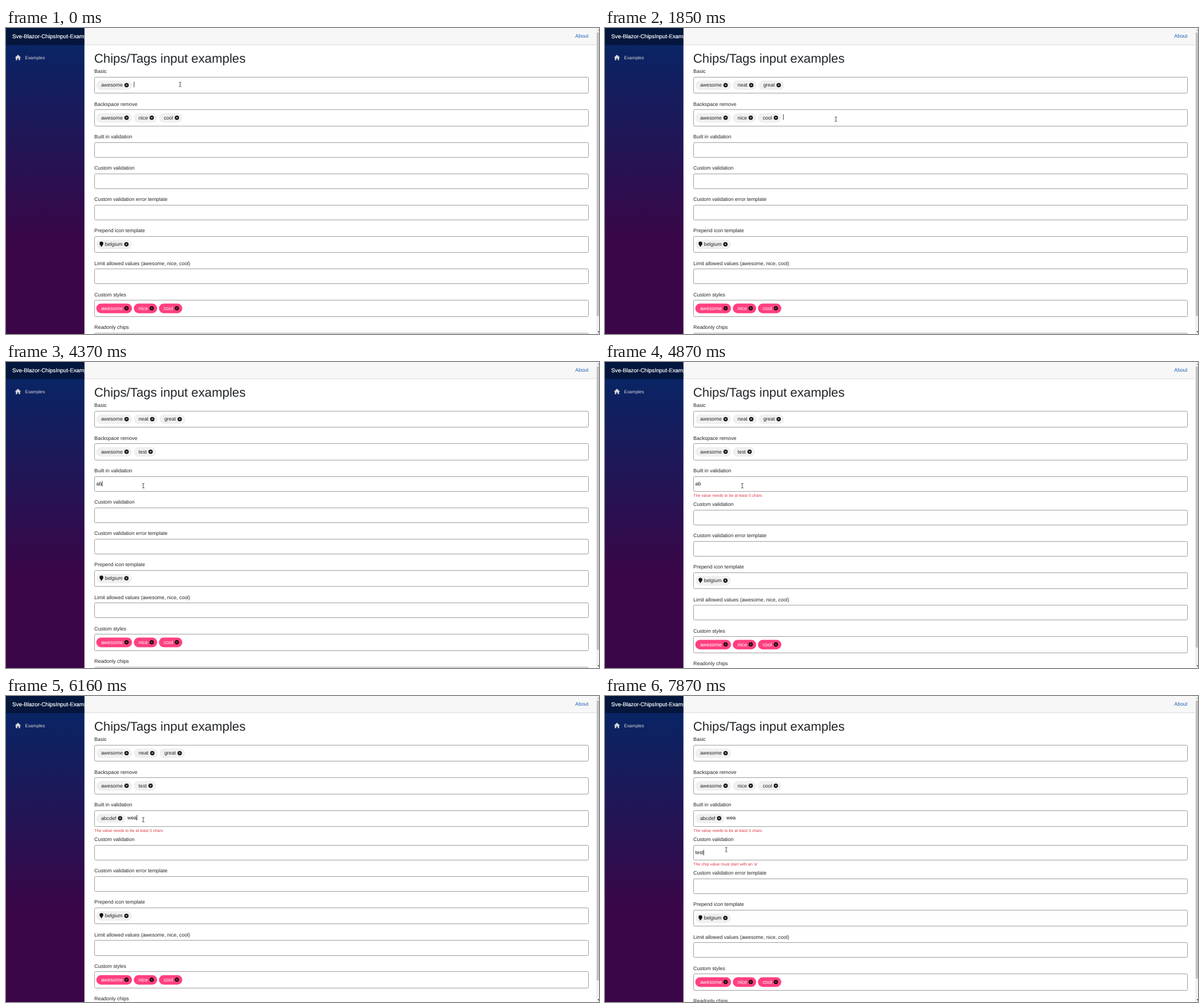
Recreate the animation shown at these times as an HTML page. Size 1041 px wide and 538 px high, loop 8000 ms.

```html
<!DOCTYPE html>
<html lang="en">
<head>
<meta charset="utf-8">
<title>Chips input examples</title>
<style>
  html, body { margin: 0; width: 100%; height: 100%; overflow: hidden; background: #fff; }
  svg { display: block; width: 100vw; height: 100vh; }
  text { font-family: "Liberation Sans", Arial, sans-serif; font-size: 8.9px; fill: #212529; text-rendering: geometricPrecision; }
  .heading { font-size: 22.25px; }
  .brand { font-size: 9.79px; fill: #fff; stroke: #fff; stroke-width: .2; }
  .nav { font-size: 7.96px; fill: #d7d7d7; }
  .link { fill: #1f63b5; }
  .error { font-size: 7.12px; fill: #dc3545; }
  .box { fill: #fff; stroke: #7c7c7c; stroke-width: .75; }
  .caret { fill: #222; }
</style>
</head>
<body>
<svg viewBox="0 0 1041 538" preserveAspectRatio="none" xmlns="http://www.w3.org/2000/svg">
  <defs>
    <linearGradient id="side" x1="0" y1="0" x2="0" y2="1">
      <stop offset="0" stop-color="#052767"/>
      <stop offset=".7" stop-color="#3a0647"/>
    </linearGradient>
    <clipPath id="sideClip"><rect width="137.7" height="538"/></clipPath>
  </defs>
  <rect width="1041" height="538" fill="#fff"/>
  <rect x="137" width="899" height="30" fill="#f7f7f7"/>
  <rect x="137" y="29.2" width="899" height=".8" fill="#d6d5d5"/>
  <text class="link" x="999.3" y="17.3">About</text>
  <g clip-path="url(#sideClip)">
    <rect width="138" height="538" fill="url(#side)"/>
    <rect width="138" height="30" fill="#000" fill-opacity=".4"/>
    <text class="brand" x="11.1" y="17.5">Sve-Blazor-ChipsInput-Examples</text>
    <path d="M21 47 L26.3 52 H24.8 V56.5 H22.2 V53.4 H19.8 V56.5 H17.2 V52 H15.7 Z" fill="#d7d7d7"/>
    <text class="nav" x="33.6" y="55">Examples</text>
  </g>
  <text class="heading" x="154.7" y="61.3">Chips/Tags input examples</text>
  <g id="form"></g>
  <rect x="1036" width="5" height="538" fill="#f1f1f1"/>
  <rect id="thumb" x="1037" y="8" width="4" height="498" fill="#c1c1c1"/>
  <path d="M1038.3 5 L1041 2.2 V5 Z" fill="#a3a3a3"/>
  <path d="M1038.3 533 H1041 V536 Z" fill="#505050"/>
  <path id="mouse" d="M-2 -4 Q-.3 -4 0 -3.2 Q.3 -4 2 -4 M0 -3.4 V3.4 M-2 4 Q-.3 4 0 3.2 Q.3 4 2 4" fill="none" stroke="#333" stroke-width=".9"/>
</svg>
<script>
const LOOP = 8000;
const LEFT = 155.5, INNER = 158.5;
const form = document.getElementById("form");
const thumb = document.getElementById("thumb");
const mouse = document.getElementById("mouse");

const pen = document.createElement("canvas").getContext("2d");
pen.font = '89px "Liberation Sans", Arial, sans-serif';
const widths = {};
const textWidth = s => widths[s] ??= pen.measureText(s).width / 10;

const BASIC = 0, BACKSPACE = 1, BUILTIN = 2, CUSTOM = 3;
const trio = ["awesome", "nice", "cool"];

function initialFields() {
  const field = (label, chips = [], style = "") => ({ label, chips, style, input: "", error: "" });
  return [
    field("Basic", ["awesome"]),
    field("Backspace remove", trio),
    field("Built in validation"),
    field("Custom validation"),
    field("Custom validation error template"),
    field("Prepend icon template", ["belgium"], "pin"),
    field("Limit allowed values (awesome, nice, cool)"),
    field("Custom styles", trio, "pink"),
    field("Readonly chips", trio)
  ];
}

// Timeline of edits, applied in order up to the current time
const events = [];
const at = (time, edit) => events.push({ time, edit });
const type = (start, step, index, chars) => [...chars].forEach((c, i) =>
  at(start + i * step, s => { s.fields[index].input += c; s.caret = true; }));
const commit = (time, index) => at(time, s => {
  const f = s.fields[index];
  f.chips = [...f.chips, f.input];
  f.input = "";
  s.caret = true;
});
const popChip = (time, index) => at(time, s => {
  s.fields[index].chips = s.fields[index].chips.slice(0, -1);
  s.caret = true;
});
const setError = (time, index, text) => at(time, s => { s.fields[index].error = text; s.caret = true; });
const focus = (time, index) => at(time, s => { s.focus = index; s.caret = true; });
const blink = (time, on) => at(time, s => { s.caret = on; });

const tooShort = "The value needs to be at least 5 chars";

type(500, 70, BASIC, "neat");
commit(880, BASIC);
type(1080, 55, BASIC, "great");
commit(1440, BASIC);

focus(1850, BACKSPACE);
blink(2080, false);
blink(2350, true);
popChip(2540, BACKSPACE);
popChip(2780, BACKSPACE);
blink(3120, false);
type(3170, 50, BACKSPACE, "test");
commit(3420, BACKSPACE);

focus(3830, BUILTIN);
blink(4020, false);
type(4210, 160, BUILTIN, "ab");
setError(4600, BUILTIN, tooShort);
blink(4870, false);
type(5070, 90, BUILTIN, "cdef");
setError(5130, BUILTIN, "");
commit(5520, BUILTIN);
type(5790, 70, BUILTIN, "wea");
setError(6160, BUILTIN, tooShort);
blink(6430, false);

focus(7100, CUSTOM);
blink(7300, false);
type(7460, 150, CUSTOM, "te");
type(7760, 0, CUSTOM, "st");
setError(7870, CUSTOM, "The chip value must start with an 'a'");
at(7870, s => {
  s.fields[BASIC].chips = ["awesome"];
  s.fields[BACKSPACE].chips = trio;
});
events.sort((a, b) => a.time - b.time);

// Pointer stops: time, x, y
const stops = [
  [0, 305.7, 99.2], [1480, 305.7, 99.2], [1690, 427, 148], [1810, 405.3, 160.3],
  [3550, 405.3, 160.3], [3800, 241, 217.5],
  [6680, 241, 217.5], [7060, 212.8, 270], [LOOP, 212.8, 270]
];

function pointerAt(time) {
  const t = Math.floor(time / 40) * 40;
  const i = stops.findIndex((s, k) => k > 0 && t <= s[0]);
  const [t0, x0, y0] = stops[i - 1], [t1, x1, y1] = stops[i];
  const p = (t - t0) / (t1 - t0);
  const e = p * p * (3 - 2 * p);
  return [x0 + (x1 - x0) * e, y0 + (y1 - y0) * e];
}

const text = (x, y, s, attrs = "") => `<text x="${x}" y="${y}" ${attrs}>${s}</text>`;

function chip(x, top, label, style) {
  const pink = style === "pink", pin = style === "pin" ? 6.6 : 0;
  const fill = pink ? "#ff4081" : "#f0f0f0";
  const w = textWidth(label) + pin;
  const cx = x + w + 15.1, cy = top + 13.9;
  let out = `<rect x="${x}" y="${top + 5.8}" width="${w + 24.6}" height="16.8" rx="8.4" fill="${fill}"/>`;
  if (pin) {
    const px = x + 9;
    out += `<path d="M${px} ${cy + 4.8} C${px - 1} ${cy + 2.4} ${px - 3.3} ${cy + 1} ${px - 3.3} ${cy - 1.4}
      a3.3 3.3 0 0 1 6.6 0 C${px + 3.3} ${cy + 1} ${px + 1} ${cy + 2.4} ${px} ${cy + 4.8} Z" fill="#111"/>`;
  }
  out += text(x + 8.4 + pin, top + 16.9, label, pink ? 'style="fill:#fff"' : "");
  out += `<circle cx="${cx}" cy="${cy}" r="3.75" fill="#0c0c0c"/>`;
  out += `<path d="M${cx - 1.4} ${cy - 1.4} l2.8 2.8 m0 -2.8 l-2.8 2.8" stroke="${fill}"/>`;
  return { out, next: x + w + 27.8 };
}

function drawForm(state) {
  let top = 86.5, html = "";
  state.fields.forEach((f, i) => {
    const h = f.chips.length ? 28.4 : 26.2;
    const y0 = Math.floor(top) + .5, y1 = Math.floor(top + h) + .5;
    html += text(155.1, top - 7.1, f.label);
    html += `<rect class="box" x="${LEFT}" y="${y0}" width="867" height="${y1 - y0}" rx="2"/>`;
    let x = INNER;
    for (const label of f.chips) {
      const c = chip(x, top, label, f.style);
      html += c.out;
      x = c.next;
    }
    if (f.input) html += text(x, top + 15.9, f.input, 'style="fill:#111"');
    if (state.focus === i && state.caret) {
      html += `<rect class="caret" x="${x + textWidth(f.input)}" y="${top + 8}" width=".9" height="9.8"/>`;
    }
    if (f.error) html += text(155.1, top + h + 9.9, f.error, 'class="error"');
    top += h + 28.9 + (f.error ? 3.9 : 0);
  });
  form.innerHTML = html;
  const growth = top - 593.4;
  thumb.setAttribute("height", Math.round(498 - growth * .94));
}

let shown = -1;
function render(time) {
  const count = events.filter(e => e.time <= time).length;
  if (count !== shown) {
    const state = { fields: initialFields(), focus: BASIC, caret: true };
    events.slice(0, count).forEach(e => e.edit(state));
    drawForm(state);
    shown = count;
  }
  const [x, y] = pointerAt(time);
  mouse.setAttribute("transform", `translate(${x} ${y})`);
}

const start = performance.now();
function tick() {
  render((performance.now() - start) % LOOP);
  requestAnimationFrame(tick);
}
tick();
</script>
</body>
</html>
```
